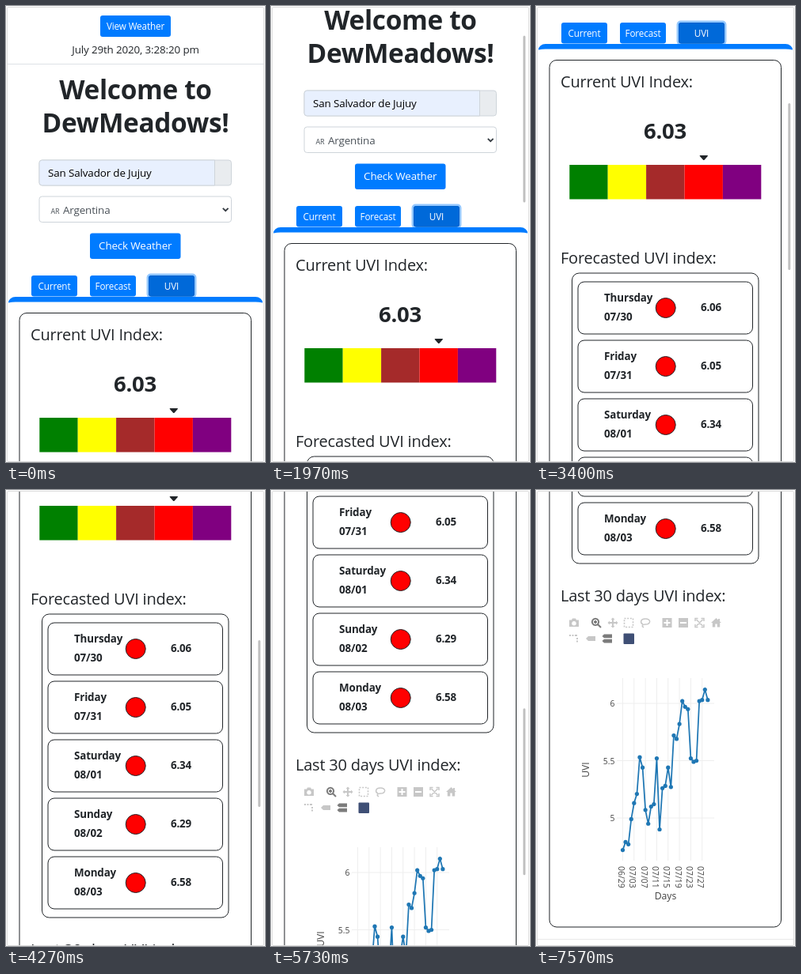
Animation, 327 px wide and 577 px high, one loop 8130 ms. Source, as an HTML page:

```html
<!DOCTYPE html>
<html lang="en">
<head>
<meta charset="utf-8">
<title>UVI page</title>
<style>
html, body { margin: 0; width: 100%; height: 100%; overflow: hidden; background: #fff; }
svg { display: block; width: 100%; height: 100%; }
text { font-family: "Open Sans", "Noto Sans", sans-serif; font-size: 13.4px; letter-spacing: -.01em; fill: #212529; }
.mid { text-anchor: middle; }
.bold { font-weight: 700; }
.h1 { font-size: 33.4px; }
.h4 { font-size: 20px; }
.uvi { font-size: 27.5px; }
.btn { fill: #fff; }
.small { font-size: 11.7px; }
.tick { font-size: 10.4px; letter-spacing: 0; fill: #444; }
.axis { font-size: 12.2px; letter-spacing: 0; fill: #444; }
.card { fill: none; stroke: #212529; }
.grid { stroke: #eee; }
.icon { fill: none; stroke: #c7c7c7; stroke-width: 2; }
.on { stroke: #7c7c7c; }
</style>
</head>
<body>
<svg viewBox="0 0 327 577">
  <defs><clipPath id="view"><rect x="2" y="2" width="323" height="574"/></clipPath></defs>
  <rect width="327" height="577" fill="#fff"/>
  <g clip-path="url(#view)"><g id="page"></g></g>
  <rect x="1.5" y="1.5" width="324" height="575" rx="1.5" fill="none" stroke="#dcdcdc"/>
  <rect id="thumb" x="318.3" width="3" height="211" rx="1.5" fill="#c1c1c1"/>
</svg>
<script>
const LOOP = 8130;
const page = document.getElementById('page');
const thumb = document.getElementById('thumb');

const text = (x, y, s, cls = '', extra = '') => `<text x="${x}" y="${y}" class="${cls}" ${extra}>${s}</text>`;
const rect = (x, y, w, h, r, attrs) => `<rect x="${x}" y="${y}" width="${w}" height="${h}" rx="${r}" ${attrs}/>`;
const path = (d, attrs) => `<path d="${d}" ${attrs}/>`;
const button = (x, y, w, h, label, cls, base, fill = '#007bff') =>
  rect(x, y, w, h, 3, `fill="${fill}"`) + text(x + w / 2, base, label, 'btn mid ' + cls);

function header() {
  return button(119, 12, 89, 27, 'View Weather', 'small', 30)
    + text(163.5, 60, '', 'mid', 'id="clock"')
    + path('M2 73.5H325', 'stroke="#dee2e6"')
    + text(163.5, 118, 'Welcome to', 'mid bold h1')
    + text(163.5, 159.5, 'DewMeadows!', 'mid bold h1');
}

function form() {
  const line = 'stroke="#ced4da"';
  return rect(42, 195, 242.5, 32, 3.5, `fill="#e9ecef" ${line}`)
    + path('M263.5 195H45.5a3.5 3.5 0 0 0-3.5 3.5v25a3.5 3.5 0 0 0 3.5 3.5H263.5z', `fill="#e8f0fe" ${line}`)
    + text(53, 216, 'San Salvador de Jujuy', '', 'style="fill:#000"')
    + rect(42, 241, 242.5, 32.5, 3.5, `fill="#fff" ${line}`)
    + text(56.5, 262.5, 'AR', '', 'style="font-size:9px;fill:#495057"')
    + text(72, 263, 'Argentina', '', 'style="fill:#495057"')
    + path('M273.8 255.8l3.4 3.4 3.4-3.4', 'fill="none" stroke="#343a40" stroke-width="1.8"')
    + button(106, 287.5, 114.5, 32.5, 'Check Weather', '', 308);
}

function tabs() {
  return button(32, 341, 58, 26.5, 'Current', 'small', 359)
    + button(106, 341, 58, 26.5, 'Forecast', 'small', 359)
    + rect(177.6, 338.6, 62.8, 31, 5, 'fill="#93c7ff"')
    + button(180, 341, 58, 26.5, 'UVI', 'small', 359, '#0069d9')
    + rect(180.5, 341.5, 57, 25.5, 3, 'fill="none" stroke="#0062cc"')
    + path('M3 375.5A9 7.5 0 0 1 12 368H315A9 7.5 0 0 1 324 375.5Q320 374.5 315 374.5H12Q7 374.5 3 375.5Z', 'fill="#007bff"');
}

function current() {
  const bands = ['green', 'yellow', 'brown', 'red', 'purple'];
  return text(31, 423, 'Current UVI Index:', 'h4')
    + text(163, 488, '6.03', 'mid bold uvi')
    + path('M207.5 509h8.6q1.6 0 .5 1.2l-3.8 4.4q-1 1-2 0l-3.8-4.4q-1.1-1.2.5-1.2z', 'fill="#212529"')
    + bands.map((c, i) => rect(42.3 + i * 48.4, 521, 48.4, 43.5, 0, `fill="${c}"`)).join('');
}

function forecast() {
  const days = [['Thursday', '07/30', '6.06'], ['Friday', '07/31', '6.05'], ['Saturday', '08/01', '6.34'],
    ['Sunday', '08/02', '6.29'], ['Monday', '08/03', '6.58']];
  const row = ([day, date, value], i) => {
    const y = 669 + i * 74;
    return rect(53, y, 220.5, 66, 8, 'class="card"')
      + text(86, y + 25, day, 'bold') + text(86, y + 49, date, 'bold')
      + `<circle cx="163.7" cy="${y + 33}" r="12.5" fill="red" stroke="#212529"/>`
      + text(221, y + 37, value, 'mid bold');
  };
  return text(31, 646, 'Forecasted UVI index:', 'h4')
    + rect(45.5, 658, 235.5, 384, 9, 'class="card"') + days.map(row).join('');
}

// Toolbar glyphs, each drawn around its own centre.
function toolbar() {
  const tag = 'M-6 0L-3-3H6V3H-3Z';
  const solid = 'style="fill:#c7c7c7;stroke:none"';
  const icons = [
    [48, 0, 'M-6-3.5H-3L-2-5.5H2L3-3.5H6V5H-6ZM0-2A2.8 2.8 0 1 0 .01-2Z', 'style="fill:#c7c7c7;stroke:none;fill-rule:evenodd"'],
    [76, 0, 'M-1-5.2A4.1 4.1 0 1 0-.99-5.2ZM2 2L6 6M-3-1.1H1M-1-3V1', '', 1],
    [97, 0, 'M-5 0H5M0-5V5', 'stroke-width="1.5"'],
    [97, 0, 'M-6.5 0l2.5-2.5v5zM6.5 0l-2.5-2.5v5zM0-6.5l-2.5 2.5h5zM0 6.5l-2.5-2.5h5z', solid],
    [117, 0, 'M-5.5-5.5H5.5V5.5H-5.5Z', 'stroke-dasharray="2 1.67" style="stroke-width:1.6"'],
    [138, 0, 'M-3 2C-7 0-6-5 0-5C8-5 7 2 0 2C-4 2-5 4-2 6', 'style="stroke-width:1.5"'],
    [165.5, 0, 'M-6-6H6V6H-6ZM-4-1V1H-1V4H1V1H4V-1H1V-4H-1V-1Z', solid],
    [186, 0, 'M-6-6H6V6H-6ZM-4-1V1H4V-1Z', solid],
    [206.5, 0, 'M-5.5-2V-5.5H-2M2-5.5H5.5V-2M5.5 2V5.5H2M-2 5.5H-5.5V2M-4-4L4 4M4-4L-4 4', 'style="stroke-width:1.5"'],
    [227.5, 0, 'M-6.5 0L0-6L2.5-3.5V-5H4.5V-1.8L6.5 0H4.7V5.5H1.2V1.5H-1.2V5.5H-4.7V0Z', solid],
    [48, 20, 'M-6-4H3', 'stroke-dasharray="2 1.5"'],
    [48, 20, 'M4-1V6M2-4H5', 'stroke-dasharray="2 1.5"'],
    [69, 20, tag, solid],
    [90, 20, 'M-6.5-3L-4-5.5H6V-.7H-4ZM-6.5 3L-4 .7H6V5.5H-4Z', 'style="fill:#7c7c7c;stroke:none"']
  ];
  return icons.map(([x, y, d, attrs, on]) =>
    path(d, `class="icon${on ? ' on' : ''}" transform="translate(${x} ${1117 + y})" ${attrs}`)).join('')
    + rect(110.5, 1130.5, 13.5, 13.5, 1, 'fill="#3f4f75"');
}

function chart() {
  const uvi = [4.72, 4.79, 4.77, 4.99, 5.13, 5.21, 5.53, 5.44, 5.07, 4.95, 5.1, 5.12, 5.52, 4.9, 5.26, 5.28,
    5.44, 5.27, 5.72, 5.69, 5.82, 6.02, 5.97, 5.95, 5.52, 5.49, 5.5, 6.02, 6.03, 6.12, 6.03];
  const px = i => +(109.5 + i * 3.58).toFixed(2);
  const py = v => +(1219 + (6 - v) * 145).toFixed(2);
  let out = text(31, 1090, 'Last 30 days UVI index:', 'h4') + toolbar();
  for (let i = 0; i < 31; i += 4) {
    const label = i ? '07/' + String(i - 1).padStart(2, '0') : '06/29';
    out += path(`M${px(i)} 1187V1418`, 'class="grid"')
      + text(0, 0, label, 'tick', `transform="translate(${px(i) - 5.5} 1425) rotate(90)"`);
  }
  for (const v of [6, 5.5, 5]) {
    out += path(`M102 ${py(v)}H225`, 'class="grid"') + text(99.5, py(v) + 4, v, 'tick', 'text-anchor="end"');
  }
  return out
    + path('M' + uvi.map((v, i) => px(i) + ' ' + py(v)).join('L'), 'fill="none" stroke="#1f77b4" stroke-width="1.75"')
    + uvi.map((v, i) => `<circle cx="${px(i)}" cy="${py(v)}" r="2.6" fill="#1f77b4"/>`).join('')
    + text(0, 0, 'UVI', 'axis mid', 'transform="translate(67 1303) rotate(-90)"')
    + text(163.5, 1467, 'Days', 'axis mid');
}

page.innerHTML = header() + form() + tabs()
  + rect(17, 388.5, 292.5, 1113.5, 9, 'class="card"')
  + current() + forecast() + chart()
  + path('M2 1517.5H325', 'stroke="#e9e9e9"');
const clock = document.getElementById('clock');

// Scroll flicks: first tick, last tick (30 per second), resting offset.
const flicks = [[43, 48, 77], [58, 64, 154], [71, 78, 234], [88, 96, 319], [102, 112, 410], [119, 128, 501],
  [140, 147, 602], [154, 161, 702], [169, 178, 795], [185, 194, 872], [201, 210, 949]];
const ease = u => 1 - (1 - u ** 1.5) ** 2;

function scrollAt(t) {
  const tick = Math.floor(t * .03 + .2);
  let from = 0;
  for (const [start, end, to] of flicks) {
    if (tick < start) break;
    if (tick < end) return Math.round(from + 1 + (to - from - 1) * ease((tick - start) / (end - start)));
    from = to;
  }
  return from;
}

function draw(t) {
  const y = scrollAt(t);
  page.setAttribute('transform', `translate(0 ${-y})`);
  clock.textContent = `July 29th 2020, 3:28:${20 + Math.floor((t + 530) / 1000)} pm`;
  thumb.setAttribute('y', (5 + y * .369).toFixed(1));
  thumb.setAttribute('opacity', t < 1430 || t >= 7570 ? 0 : t < 7430 ? 1 : .5);
}

const began = performance.now();
function loop() {
  draw((performance.now() - began) % LOOP);
  requestAnimationFrame(loop);
}
loop();
</script>
</body>
</html>
```
